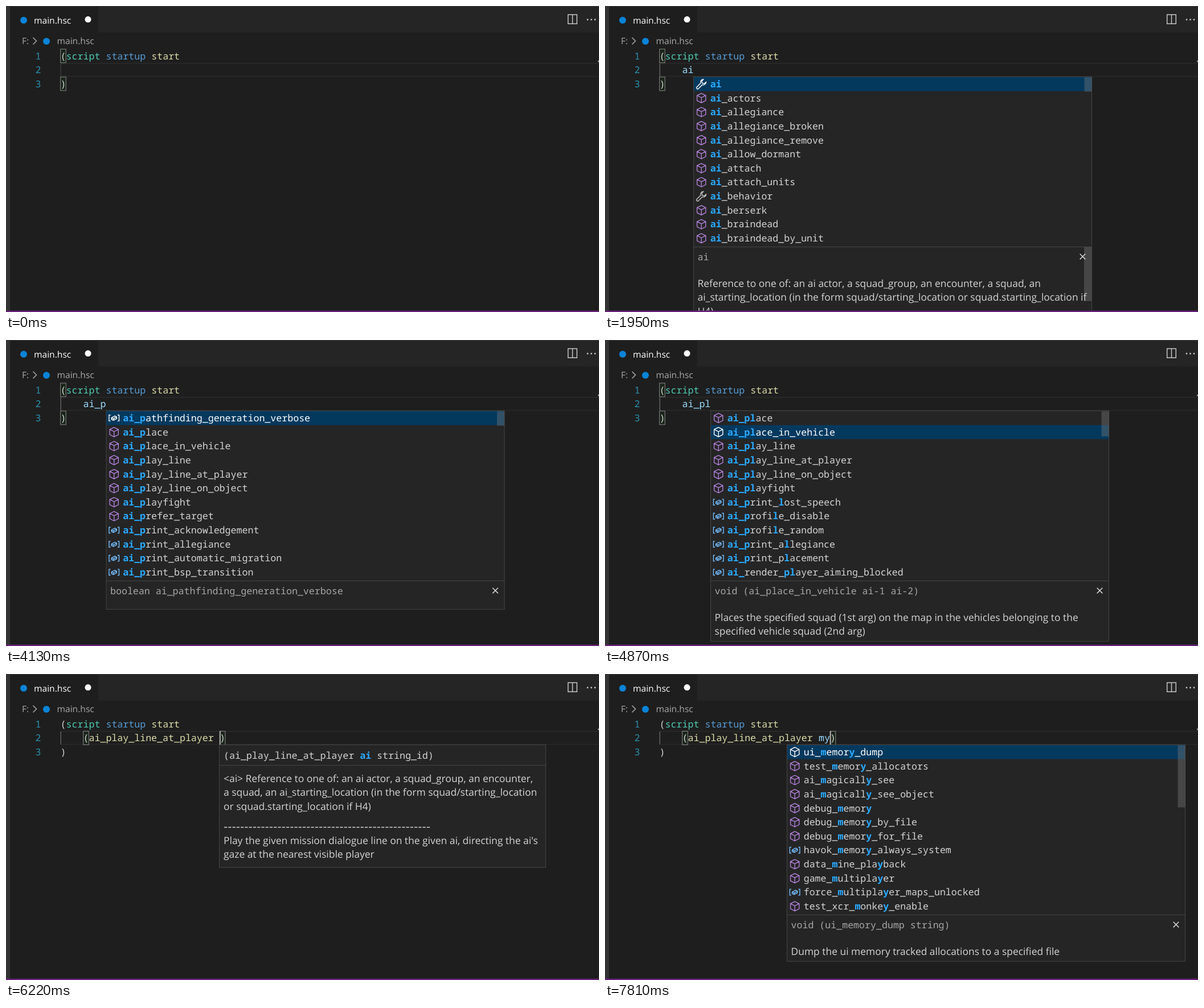
Recreate the animation shown at these times as an HTML page. Size 1041x538 px, loop 8000 ms.

```html
<!DOCTYPE html>
<html lang="en">
<head>
<meta charset="utf-8">
<title>Script completion</title>
<style>
html, body { margin: 0; width: 100%; height: 100%; overflow: hidden; background: #1e1e1e; }
svg { display: block; width: 1041px; height: 538px; }
text { white-space: pre; text-rendering: geometricPrecision; }
.mono { font: 16.63px "Noto Sans Mono", "DejaVu Sans Mono", monospace; }
.ui { font: 17.43px "Open Sans", "Noto Sans", sans-serif; }
.label { font: 15.6px "Open Sans", "Noto Sans", sans-serif; }
.hit { font-weight: 700; fill: #2aaaff; }
</style>
</head>
<body>
<svg id="stage" viewBox="0 0 1041 538"></svg>
<script>
const LOOP = 8000, CHAR = 9.978, ROW = 24.65, LEFT = 95.6, INDENT = LEFT + 4 * CHAR;
const PLAIN = '#d4d4d4', BORDER = '#454545', PANEL = '#252526';

const esc = s => s.replace(/&/g, '&amp;').replace(/</g, '&lt;');
const rect = (x, y, w, h, fill, more = '') =>
  `<rect x="${x}" y="${y}" width="${w}" height="${h}" fill="${fill}" ${more}/>`;
const path = (d, color, width = 1.4, more = '') =>
  `<path d="${d}" fill="none" stroke="${color}" stroke-width="${width}" ${more}/>`;
const dot = (x, y, r, fill) => `<circle cx="${x}" cy="${y}" r="${r}" fill="${fill}"/>`;
const rawText = (kind, x, y, markup, fill) =>
  `<text class="${kind}" x="${x}" y="${y}" fill="${fill}">${markup}</text>`;
const text = (kind, x, y, s, fill = PLAIN) => rawText(kind, x, y, esc(s), fill);
const mono = (x, y, s, fill) => text('mono', x, y, s, fill);
const lines = (x, y, list) => list.map((s, i) => text('ui', x, y + i * ROW, s)).join('');

// Icon kinds: m = method, v = variable, p = property
const icons = {
  m: ['#b180d7', 'M0-8.3L7.6-4.6V4.4L0 8.3L-7.6 4.4V-4.6ZM-7.6-4.6L0-.8L7.6-4.6M0-.8V8.3'],
  v: ['#75beff', 'M-6.2-5.2H-8.8V5.2H-6.2M6.2-5.2H8.8V5.2H6.2M-4.6-.4L1.2-3.6L4.6-2V1L-1.2 4L-4.6 2.4ZM-4.6-.4L-1.2 1.2L4.6-2M-1.2 1.2V4'],
  p: ['#c5c5c5', 'M3.5-8.3A5 5 0 0 0-1.2-1.7L-8 5.2A1.9 1.9 0 0 0-5.2 8L1.7 1.2A5 5 0 0 0 8.3-3.5L5-.7L1.5-1.5L.7-5Z']
};

const AI_REST = 'm:ai_actors m:ai_allegiance m:ai_allegiance_broken m:ai_allegiance_remove m:ai_allow_dormant ' +
  'm:ai_attach m:ai_attach_units p:ai_behavior m:ai_berserk m:ai_braindead m:ai_braindead_by_unit';
const PLAY = 'm:ai_place m:ai_place_in_vehicle m:ai_play_line m:ai_play_line_at_player m:ai_play_line_on_object m:ai_playfight ';

const menus = {
  ai: { x: 155.5, thumb: 25, items: 'p:ai ' + AI_REST },
  ai_: { x: 165.5, thumb: 25, items: AI_REST + ' m:ai_bring_forward' },
  ai_p: { x: 176, thumb: 25, items: 'v:ai_pathfinding_generation_verbose ' + PLAY +
    'm:ai_prefer_target v:ai_print_acknowledgement v:ai_print_allegiance v:ai_print_automatic_migration v:ai_print_bsp_transition' },
  ai_pl: { x: 185.5, thumb: 44, items: PLAY + 'v:ai_print_lost_speech v:ai_profile_disable v:ai_profile_random ' +
    'v:ai_print_allegiance v:ai_print_placement v:ai_render_player_aiming_blocked' },
  my: { x: 319.5, thumb: 109, items: 'm:ui_memory_dump m:test_memory_allocators m:ai_magically_see m:ai_magically_see_object ' +
    'm:debug_memory m:debug_memory_by_file m:debug_memory_for_file v:havok_memory_always_system m:data_mine_playback ' +
    'm:game_multiplayer v:force_multiplayer_maps_unlocked m:test_xcr_monkey_enable' }
};

const docs = {
  ai: ['ai', 'Reference to one of: an ai actor, a squad_group, an encounter, a squad, an',
    'ai_starting_location (in the form squad/starting_location or squad.starting_location if', 'H4)'],
  actors: ['object_list (ai_actors ai)', 'Converts an ai reference to an object list'],
  path: ['boolean ai_pathfinding_generation_verbose'],
  place: ['void (ai_place ai)', 'Places the specified squad on the map'],
  vehicle: ['void (ai_place_in_vehicle ai-1 ai-2)',
    'Places the specified squad (1st arg) on the map in the vehicles belonging to the', 'specified vehicle squad (2nd arg)'],
  line: ['real (ai_play_line ai string_id)', 'Play the given mission dialogue line on the given ai'],
  player: ['real (ai_play_line_at_player ai string_id)',
    "Play the given mission dialogue line on the given ai, directing the ai's gaze at the", 'nearest visible player'],
  dump: ['void (ui_memory_dump string)', 'Dump the ui memory tracked allocations to a specified file']
};

const CALL = '(ai_play_line_at_player ';

// Each step overrides parts of the state before it
const steps = [
  [0, { line: '', caret: 0, menu: '', doc: '', sel: 0, thumb: 1, hint: 0 }],
  [120, { caret: 1 }], [600, { caret: 0 }], [1100, { caret: 1 }],
  [1310, { line: 'a' }], [1450, { line: 'ai' }], [1500, { menu: 'ai' }], [1580, { doc: 'ai' }],
  [1950, { caret: 0 }],
  [2190, { line: 'ai_', caret: 1 }], [2220, { menu: 'ai_', doc: 'actors' }],
  [2680, { caret: 0 }], [2970, { thumb: 0 }], [3130, { caret: 1 }], [3610, { caret: 0 }],
  [3680, { line: 'ai_p', caret: 1 }], [3750, { menu: 'ai_p', doc: 'path', thumb: 1 }],
  [4130, { caret: 0 }],
  [4160, { line: 'ai_pl', caret: 1, menu: 'ai_pl', doc: 'place' }], [4640, { caret: 0 }],
  [4870, { sel: 1, doc: 'vehicle' }], [5070, { sel: 2, doc: 'line' }], [5100, { caret: 1 }],
  [5270, { sel: 3, doc: 'player', thumb: .15 }], [5600, { caret: 0 }], [6080, { caret: 1 }],
  [6120, { line: CALL, menu: '', doc: '' }], [6220, { hint: 1 }],
  [6690, { caret: 0 }], [7170, { caret: 1 }], [7620, { caret: 0 }],
  [7690, { line: CALL + 'm', caret: 1 }], [7750, { line: CALL + 'my' }],
  [7810, { menu: 'my', doc: 'dump', sel: 0, thumb: 1, hint: 0 }]
];

// Marks the typed letters: the first at a word start, the rest in order
function mark(name, query) {
  let n = 0;
  return [...name].map((c, i) => {
    const hit = c === query[n] && (n > 0 || i === 0 || name[i - 1] === '_');
    if (hit) n++;
    return hit ? `<tspan class="hit">${c}</tspan>` : c;
  }).join('');
}

function drawFrame() {
  return rect(0, 0, 1041, 538, '#1e1e1e') + rect(162, 1, 879, 45.5, PANEL) +
    rect(0, 0, 1041, 1, '#3a3a3a') + rect(0, 0, 7, 538, '#333333') +
    dot(31, 25, 6, '#0a84d8') + text('label', 49, 30.5, 'main.hsc', '#fff') + dot(144, 23.6, 5.5, '#fff') +
    path('M986.7 15.2H1002.3V31.2H986.7ZM994.5 15V31', '#c5c5c5', 1.5) +
    [1021, 1027.5, 1034].map(x => dot(x, 24, 1.4, '#c5c5c5')).join('') +
    text('label', 28, 67.3, 'F:', '#a9a9a9') + path('M47.5 55.5L53.5 61.5L47.5 67.5', '#a9a9a9', 1.5) +
    dot(71, 62, 6, '#0a84d8') + text('label', 89.5, 67.3, 'main.hsc', '#a9a9a9') +
    rect(1039, 96, 2, 2.5, '#a0a0a0');
}

const bracketBox = (x, y) => rect(x, y, 9.5, 24, 'rgba(0,100,0,.1)', 'stroke="#888" stroke-width="1"');

function drawCode({ line, caret }) {
  const call = line[0] === '(', end = INDENT + line.length * CHAR;
  let out = rect(97, 100, 944, 1.8, '#282828') + rect(97, 122.8, 944, 1.8, '#282828') +
    rect(95.6, 101, 1.2, 23, line ? '#707070' : '#404040');
  out += call ? bracketBox(INDENT + .2, 100.5) + bracketBox(end + .4, 100.5)
    : bracketBox(95.7, 75.8) + bracketBox(95.7, 124.8);
  for (let i = 0; i < 3; i++) out += mono(51.5, 93.5 + i * ROW, String(i + 1), '#2b91af');
  const word = (col, s, fill) => mono(LEFT + col * CHAR, 93.5, s, fill);
  out += word(0, '(') + word(1, 'script', '#4ec9b0') + word(8, 'startup', '#569cd6') + word(16, 'start', '#dcdcaa');
  if (call) {
    out += mono(INDENT, 118.1, '(') + mono(INDENT + CHAR, 118.1, CALL.slice(1), '#dcdcaa') +
      mono(INDENT + CALL.length * CHAR, 118.1, line.slice(CALL.length), '#9cdcfe') + mono(end, 118.1, ')');
  } else out += mono(INDENT, 118.1, line, '#9cdcfe');
  out += mono(LEFT, 142.8, ')');
  return out + (caret ? rect(end - .2, 100.3, 2, 24.2, '#aeafad') : '');
}

function drawMenu({ menu, doc, sel, thumb, line }) {
  const { x, thumb: size, items } = menus[menu], query = line.replace(CALL, '');
  const frame = (y, h) => rect(x, y, 699, h, PANEL, `stroke="${BORDER}"`);
  let out = frame(124.5, 299) + rect(x + .5, 125 + sel * ROW, 698, ROW, '#04395e');
  items.split(' ').forEach((item, i) => {
    const [color, shape] = icons[item[0]], on = i === sel;
    out += path(shape, on ? '#fff' : color, 1.4, `transform="translate(${x + 13.7} ${137.2 + i * ROW})"`) +
      rawText('mono', x + 29.2, 142.9 + i * ROW, mark(item.slice(2), query), on ? '#fff' : PLAIN);
  });
  out += rect(x + 686, 125.5, 13, size, '#797979', `fill-opacity="${.4 * thumb}"`);
  if (!doc) return out;
  const [head, ...body] = docs[doc], cx = x + 683, cy = 440.6;
  out += frame(423.5, body.length ? 57 + body.length * ROW : 50);
  if (body.length > 2) out += rect(x + 685.5, 424, 13, 95, '#464647');
  return out + mono(x + 7, 447.2, head, '#a6a6a6') + lines(x + 7, 493.8, body) +
    path(`M${cx - 4.8} ${cy - 4.8}l9.6 9.6m0-9.6l-9.6 9.6`, PLAIN, 1.5);
}

function drawHint() {
  return rect(374.5, 124.5, 573, 215.5, PANEL, `stroke="${BORDER}"`) + rect(375, 160, 572, 1, BORDER) +
    rawText('mono', 382, 148.5, '(ai_play_line_at_player <tspan class="hit">ai</tspan> string_id)', PLAIN) +
    lines(382, 189.8, ['<ai> Reference to one of: an ai actor, a squad_group, an encounter,',
      'a squad, an ai_starting_location (in the form squad/starting_location', 'or squad.starting_location if H4)']) +
    path('M383 269.5H745', PLAIN, 1.4, 'stroke-dasharray="5.2 2.06"') +
    lines(382, 298.6, ["Play the given mission dialogue line on the given ai, directing the ai's",
      'gaze at the nearest visible player']);
}

const stage = document.getElementById('stage'), start = performance.now();
let shown = -1;

function tick() {
  const t = (performance.now() - start) % LOOP;
  const count = steps.filter(([at]) => at <= t).length;
  if (count !== shown) {
    shown = count;
    const state = Object.assign({}, ...steps.slice(0, count).map(([, change]) => change));
    stage.innerHTML = drawFrame() + drawCode(state) + (state.hint ? drawHint() : '') +
      (state.menu ? drawMenu(state) : '') + rect(0, 535.6, 1041, 2.4, '#68217a');
  }
  requestAnimationFrame(tick);
}
tick();
</script>
</body>
</html>
```
